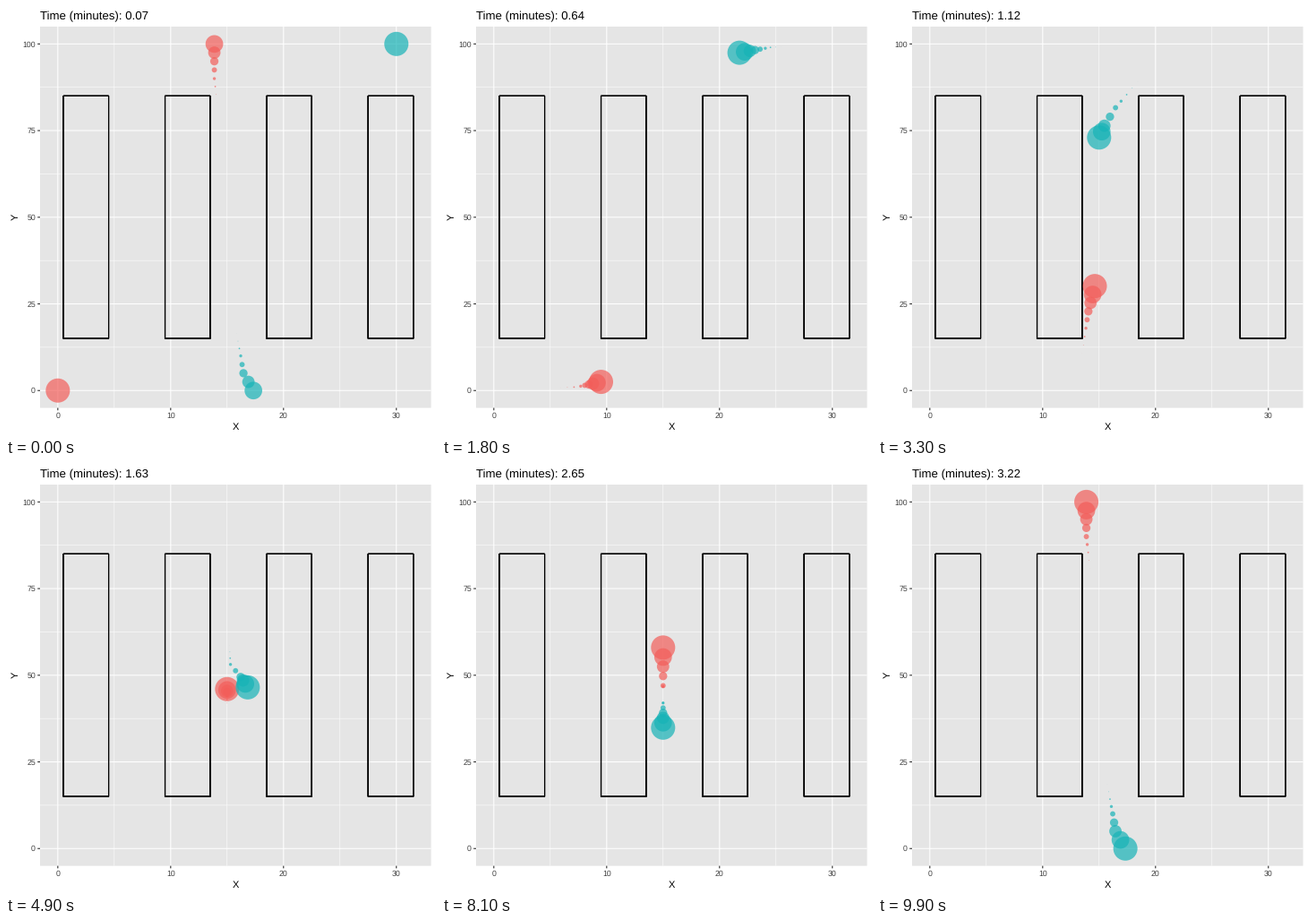
A matplotlib script for the animation above (10 s loop, 480x480 px).

```python
import matplotlib.pyplot as plt
import numpy as np
from matplotlib.animation import FuncAnimation
from matplotlib.patches import Rectangle

plt.rcParams["font.family"] = "Liberation Sans"
plt.rcParams["text.hinting"] = "none"

SIZE, DPI = 480, 72          # at 72 dpi one point is one pixel
FRAMES, INTERVAL = 100, 100
T0, T1 = 0.07, 3.22
WAKE, RADIUS, ALPHA = 10, 13.5, 0.7
RED, TEAL = "#F35E5A", "#17B3B7"
LEFT, RIGHT, TOP, BOTTOM = 38.0, 474.5, 23.0, 448.6
X_TICKS, Y_TICKS = np.arange(0, 31, 10), np.arange(0, 101, 25)


def px(x):
    return LEFT + (x + 1.575) / 34.65 * (RIGHT - LEFT)


def py(y):
    return BOTTOM - (y + 5) / 110 * (BOTTOM - TOP)


def glide(*keys):
    """Value at every step, moving steadily between (step, value) keys."""
    return np.interp(np.arange(FRAMES), *zip(*keys))


red_x = glide((0, 0), (13, 7.7), (18, 9.5), (25, 13.5), (30, 14.05),
              (35, 15), (81, 15), (95, 13.87))
red_y = glide((0, 0), (12, 1), (20, 3), (25, 10.7), (35, 35), (45, 45),
              (49, 46), (66, 45), (77, 47), (81, 58), (95, 90), (99, 100))
teal_x = glide((0, 30), (21, 20.4), (31, 15.47), (33, 15), (44, 15.3),
               (46, 16.2), (51, 17.25), (56, 15), (85, 15), (97, 16.45),
               (99, 17.33))
teal_y = glide((0, 100), (12, 99), (21, 96.7), (29, 81.6), (31, 76.4),
               (33, 73), (46, 49.5), (56, 39.5), (62, 42), (76, 42),
               (88, 24.9), (95, 10), (99, 0))

fig = plt.figure(figsize=(SIZE / DPI, SIZE / DPI), dpi=DPI, facecolor="white")
ax = fig.add_axes([0, 0, 1, 1])
ax.set_xlim(0, SIZE)
ax.set_ylim(SIZE, 0)
ax.axis("off")


def line(xs, ys, color, width, z):
    ax.plot(xs, ys, color=color, lw=width, zorder=z, snap=False,
            solid_capstyle="butt")


def label(x, y, text, size, color="black", **kw):
    return ax.text(x, y, text, fontsize=size, color=color, **kw)


def box(x0, y0, x1, y1, z, **kw):
    ax.add_patch(Rectangle((x0, y0), x1 - x0, y1 - y0, zorder=z,
                           snap=False, **kw))


def grid(xs, ys, width, z):
    for x in xs:
        line([px(x)] * 2, [TOP, BOTTOM], "white", width, z)
    for y in ys:
        line([LEFT, RIGHT], [py(y)] * 2, "white", width, z)


# panel and axes
box(LEFT, TOP, RIGHT, BOTTOM, 0, fc="#E5E5E5", lw=0)
grid(X_TICKS[:-1] + 5, Y_TICKS[:-1] + 12.5, 0.53, 1)
grid(X_TICKS, Y_TICKS, 1.07, 2)

for x in X_TICKS:
    line([px(x)] * 2, [BOTTOM, BOTTOM + 2.74], "#272727", 1.07, 2)
    label(px(x), 460, str(x), 8.8, "#3F3F3F", ha="center")
for y in Y_TICKS:
    line([LEFT - 2.74, LEFT], [py(y)] * 2, "#272727", 1.07, 2)
    label(33, py(y) + 3.1, str(y), 8.8, "#3F3F3F", ha="right")

label((LEFT + RIGHT) / 2, 473, "X", 11, ha="center")
label(13.4, (TOP + BOTTOM) / 2, "Y", 11, ha="center", rotation=90,
      rotation_mode="anchor")
title = label(LEFT, 15, "", 13.2)

# shelves, overdrawn so that soft edges build up to black
for x in np.arange(0.5, 28, 9):
    for _ in range(6):
        box(px(x), py(85), px(x + 4), py(15), 3, fill=False, ec="black",
            lw=1.07)

# dots with a shrinking wake, oldest drawn first
ages = np.arange(WAKE - 1, -1, -1)
radii = RADIUS * (1 - ages / WAKE) ** 3


def trail(color, z):
    return ax.scatter(ages, ages, s=(2 * radii) ** 2, c=[color] * WAKE,
                      alpha=ALPHA, linewidths=0, zorder=z)


trails = [
    (trail(RED, 4), np.column_stack([px(red_x), py(red_y)])),
    (trail(TEAL, 5), np.column_stack([px(teal_x), py(teal_y)])),
]


def update(i):
    for dots, path in trails:
        dots.set_offsets(path[(i - ages) % FRAMES])
    now = T0 + (T1 - T0) * i / (FRAMES - 1)
    title.set_text(f"Time (minutes): {now:.2f}")


anim = FuncAnimation(fig, update, frames=FRAMES, interval=INTERVAL,
                     repeat=True, repeat_delay=0)
plt.show()
```
